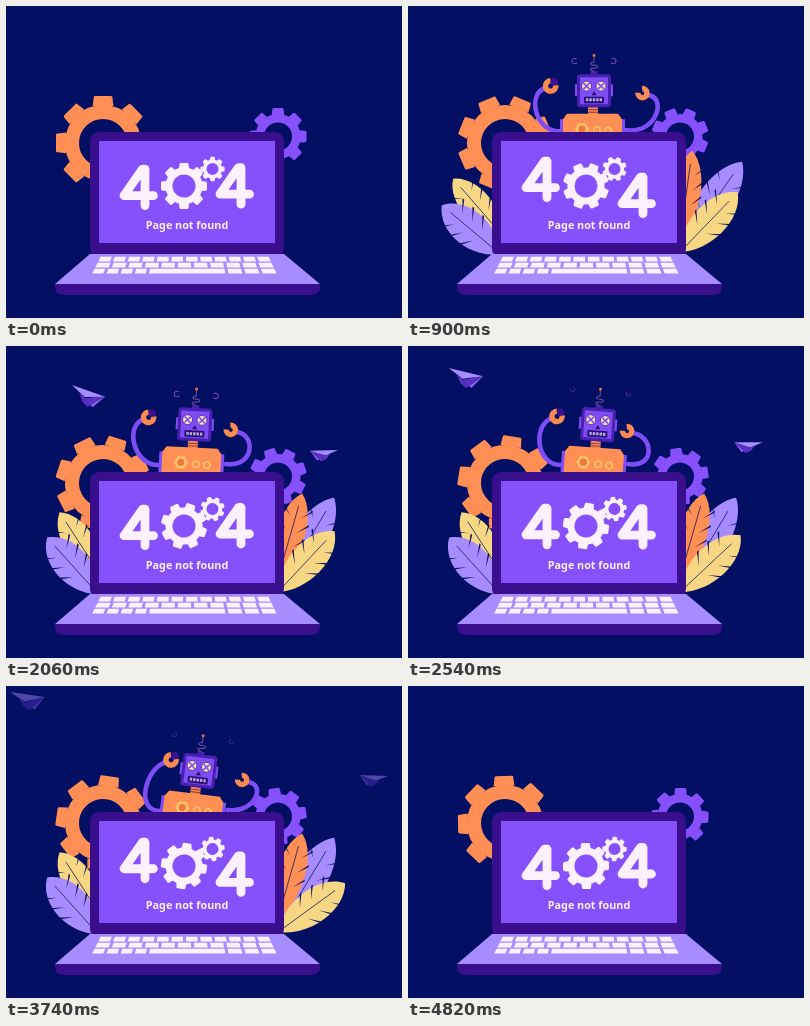
An HTML page that plays this animation: 396x312 px, repeating every 4.84 s.

```html
<!DOCTYPE html>
<html lang="en">
<head>
<meta charset="utf-8">
<title>404</title>
<style>
  html, body { margin: 0; width: 100%; height: 100%; overflow: hidden; background: #020f62; }
  svg { display: block; width: 100vw; height: 100vh; }
  text { font: 600 10.8px "Noto Sans", "Open Sans", sans-serif; }
</style>
</head>
<body>
<svg viewBox="0 0 396 312">
  <rect width="396" height="312" fill="#020f62"/>
  <g id="back"></g>
  <g id="planes"></g>

  <g id="robot">
    <g fill="none" stroke="#7f4df5" stroke-width="4.6" stroke-linecap="round">
      <path id="armL"/><path id="armR"/>
    </g>
    <g id="clawL">
      <circle cx="5.5" r="4" fill="#3a128f"/>
      <path d="M4 -3.5A5.2 5.2 0 1 0 4 3.5" fill="none" stroke="#fb8a50" stroke-width="5.4"/>
    </g>
    <g id="clawR">
      <path d="M3.5 -3A4.6 4.6 0 1 0 3.5 3" fill="none" stroke="#fb8a50" stroke-width="5.4"/>
    </g>
    <g id="torso">
      <path d="M152 112H217V142H152Z" fill="#7f4df5"/>
      <path d="M155 112L159 106.500H210L214 112V142H155Z" fill="#ff8f55"/>
      <path d="M167 122l3.500-6h7l3.500 6-3.500 6h-7Z" fill="#ffc46a"/>
      <circle cx="174" cy="122" r="3.600" fill="#f0783f"/>
      <g fill="#ff8f55" stroke="#ffc46a" stroke-width="1.600">
        <circle cx="189" cy="123" r="3.200"/><circle cx="200" cy="123.500" r="3.200"/>
      </g>
      <path d="M180 100h10v7h-10Z" fill="#fb8a50"/>
      <path d="M180 102.500h10M180 105h10" stroke="#8a3550"/>
      <path d="M167 77h38v12h-38Z" fill="#7f4df5"/>
      <path d="M169 69l2-2h30l2 2v29l-2 2h-30l-2-2Z" fill="#4a20b0"/>
      <path d="M172 70h28v27h-28Z" fill="#7f4df5"/>
      <g id="eyes"></g>
      <path d="M186 84l2.500 4h-5Z" fill="#2a0d78"/>
      <rect x="176" y="89.500" width="20" height="6.500" rx="1" fill="#2a0d78"/>
      <path d="M178 92.700h16" stroke="#b7a9d8" stroke-width="3" stroke-dasharray="2.400 1"/>
      <path d="M182 67h8l-1-3h-6Z" fill="#4a20b0"/>
      <path d="M186 64c-5-1-5-3 0-3s5-3 0-3-4-3 0-3v-7" fill="none" stroke="#6a4a9c" stroke-width="1.100"/>
      <circle cx="186" cy="48" r="1.500" fill="#e0763f"/>
      <g fill="none" stroke-width="1.200">
        <path id="sparkL" d="M-2 2.500a3 3 0 1 1 4 0" stroke="#6b45c8"/>
        <path id="sparkR" d="M-2 2.500a3 3 0 1 1 4 0" stroke="#8a45a8"/>
      </g>
    </g>
  </g>

  <g id="leaves"></g>

  <rect x="84" y="126" width="194" height="126" rx="9" fill="#390f8e"/>
  <rect x="93" y="135" width="176" height="102" fill="#8650fd"/>
  <path d="M84 248H278L314 278H49Z" fill="#a78cff"/>
  <path d="M49 278H314V281Q314 289 304 289H59Q49 289 49 281Z" fill="#390f8e"/>
  <g id="keys" fill="#fdf1ff"></g>
  <g id="digits" fill="none" stroke="#fdf1ff" stroke-width="8.800" stroke-linejoin="round" stroke-linecap="round"></g>
  <g id="cogs"></g>
  <text x="181" y="223" text-anchor="middle" fill="#fdf1ff">Page not found</text>
</svg>
<script>
const LOOP = 4840, TAU = Math.PI * 2;
const $ = id => document.getElementById(id);

function add(parent, name, attrs = {}) {
  const el = document.createElementNS('http://www.w3.org/2000/svg', name);
  for (const k in attrs) el.setAttribute(k, attrs[k]);
  return parent.appendChild(el);
}
const set = (el, transform) => el.setAttribute('transform', transform);

// Easing over a time span
const ramp = (t, from, to) => Math.min(1, Math.max(0, (t - from) / (to - from)));
const easeIn = (t, from, to) => ramp(t, from, to) ** 2;
const easeOut = (t, from, to) => 1 - (1 - ramp(t, from, to)) ** 2;
const smooth = (t, from, to) => (1 - Math.cos(ramp(t, from, to) * Math.PI)) / 2;

// Gears make one turn per loop
function gear(parent, x, y, tip, rim, hole, color, dir) {
  const g = add(parent, 'g', { fill: color });
  add(g, 'circle', { r: (rim + hole) / 2, fill: 'none', stroke: color, 'stroke-width': rim - hole });
  const w = tip * 0.2, root = rim - 1;
  for (let a = 0; a < 360; a += 45) {
    add(g, 'path', {
      d: `M${-w * 1.1} ${-root}L${-w} ${1.5 - tip}Q${-w} ${-tip} ${1.5 - w} ${-tip}H${w - 1.5}Q${w} ${-tip} ${w} ${1.5 - tip}L${w * 1.1} ${-root}Z`,
      transform: `rotate(${a})`
    });
  }
  return t => set(g, `translate(${x} ${y}) rotate(${dir * 360 * t / LOOP})`);
}
const gears = [
  gear($('back'), 97, 137, 47, 38, 24, '#ff8f55', 1),
  gear($('back'), 272, 130.5, 28.5, 22.5, 14, '#8650fd', -1),
  gear($('cogs'), 178, 180, 23, 18.5, 11.5, '#fdf1ff', 1),
  gear($('cogs'), 206.5, 163, 12.2, 9.6, 6, '#fdf1ff', -1)
];

// Leaves grow out of their base, swing into place, and may droop later
function leaf(x, y, len, bulge, color, angle, swing, droop = 0) {
  const g = add($('leaves'), 'g');
  const side = s => `${len * 0.25} ${s * bulge} ${len * 0.8} ${s * bulge * 1.1}`;
  add(g, 'path', {
    d: `M0 0C${side(-1)} ${len} 0C${len * 0.8} ${bulge * 1.1} ${len * 0.25} ${bulge} 0 0Z`,
    fill: color
  });
  let cuts = '';
  for (const s of [-1, 1]) {
    for (let q = 0.48; q < 0.85; q += 0.17) {
      cuts += `M${len * (q - 0.1)} ${s * bulge * 0.3}L${len * q} ${s * bulge * 0.85}h2.2Z`;
    }
  }
  add(g, 'path', { d: cuts, fill: '#0a1460' });
  add(g, 'path', { d: `M0 0H${len * 0.85}`, stroke: '#0a1460', 'stroke-width': 0.7 });
  return t => {
    const a = angle + swing * (1 - smooth(t, 1150, 1650)) + droop * smooth(t, 2060, 3240);
    const size = easeOut(t, 120, 820) * (1 - easeIn(t, 3760, 4290));
    set(g, `translate(${x} ${y}) rotate(${a}) scale(${size})`);
  };
}
const yellow = '#f8d784', lilac = '#a78cff', orange = '#ff8f55';
const leaves = [
  leaf(95, 230, 76, 19, yellow, -123, -8),
  leaf(92, 248, 76, 22, lilac, -132, -8),
  leaf(275, 240, 103, 22, lilac, -59, 4),
  leaf(272, 232, 88, 18, orange, -74, -8),
  leaf(272, 246, 83, 21, yellow, -47, 1, 11)
];

// Paper planes glide out, slowing towards a limit
const glide = (limit, dist, tau) => t => limit + dist * Math.exp((2060 - t) / tau);
const tilt = glide(0, 13, 800);
function plane(x, y, pose) {
  const g = add($('planes'), 'g');
  add(g, 'path', { d: 'M9 6L16 10L20 18L14 14Z', fill: '#5a30c4' });
  add(g, 'path', { d: 'M16 10L35 4L25 17Z', fill: '#8a66f0' });
  add(g, 'path', { d: 'M16 10L35 4L20 18Z', fill: '#5a30c4' });
  add(g, 'path', { d: 'M0 0L35 4L15 9Z', fill: lilac });
  return t => {
    g.setAttribute('opacity', ramp(t, 1350, 1750) * (1 - ramp(t, 3200, 4200)));
    set(g, `translate(${x(t)} ${y(t)}) ${pose(t)}`);
  };
}
const planes = [
  plane(glide(-26, 92, 1500), glide(1.4, 37.6, 800), t => `rotate(${tilt(t)})`),
  plane(glide(396, -64, 1100), glide(88.6, 15.4, 700), t => `rotate(${8 - tilt(t) * 0.3}) scale(-.8 .7)`)
];

// Robot
for (const x of [178.5, 193]) {
  add($('eyes'), 'circle', { cx: x, cy: 79, r: 5, fill: '#f3dfae', stroke: '#4a20b0', 'stroke-width': 0.8 });
  add($('eyes'), 'path', { d: `M${x - 3} 76l6 6m0-6l-6 6`, stroke: '#7f4df5', 'stroke-width': 1.5 });
}
function robot(t) {
  const drift = ramp(t, 900, 3740), lean = 7 * drift;
  const lift = -5 + 105 * (1 - easeOut(t, 120, 1150) + easeIn(t, 3560, 4320));
  const lx = 142.5 + 22.5 * ramp(t, 2060, 3740), ly = 79 - 6 * drift;
  const rx = 228 - 9 * Math.cos(TAU * (t - 2580) / 2700), ry = 86 + 7 * drift;
  set($('robot'), `translate(0 ${lift})`);
  set($('torso'), `rotate(${lean} 186 140)`);
  $('armL').setAttribute('d', `M${153 + lean / 2} 124C126 126 ${lx - 24} ${ly + 5} ${lx - 4} ${ly + 2}`);
  $('armR').setAttribute('d', `M${218 + lean / 2} 123C250 127 ${rx + 25} ${ry + 2} ${rx + 4} ${ry + 2}`);
  set($('clawL'), `translate(${lx} ${ly}) rotate(-50)`);
  set($('clawR'), `translate(${rx} ${ry}) rotate(-135)`);

  const p = (t / 1160 + 0.6) % 1, dist = 12 + 20 * p;
  for (const [id, side] of [['sparkL', -1], ['sparkR', 1]]) {
    set($(id), `translate(${186 + side * dist} ${64 - 24 * p * (1.5 - p)}) rotate(${side * 260 * p}) scale(${1.1 - 0.5 * p})`);
    $(id).setAttribute('opacity', Math.min(1, p * 8, (1 - p) * 3));
  }
}

// Keyboard: each row is a list of relative key widths, wider towards the viewer
const rows = [Array(12).fill(1), Array(11).fill(1), [1, 1, 1, 1, 5.6, 1.2, 1.2, 1.2]];
rows.forEach((row, r) => {
  const top = 250.8 + r * 6, bottom = top + 4.6, total = row.reduce((a, b) => a + b);
  const px = (u, y) => 180 + (u * 2 - 1) * (85.5 + (y - 251) * 0.5);
  let from = 0;
  for (const w of row) {
    const u = from / total, v = (from + w) / total - 0.017;
    add($('keys'), 'path', {
      d: `M${px(u, top)} ${top}H${px(v, top)}L${px(v, bottom)} ${bottom}H${px(u, bottom)}Z`
    });
    from += w;
  }
});

// Digits bob in opposite directions, twice per loop
const four = x => add($('digits'), 'path', { d: `M${x} 198V161.500H${x - 2.5}L${x - 21} 188H${x + 8.5}` });
const digitL = four(139), digitR = four(235);
function digits(t) {
  const c = Math.cos((t - 1020) * 2 * TAU / LOOP);
  set(digitL, `translate(0 ${-2.2 - 4.3 * c})`);
  set(digitR, `translate(0 ${4.7 + 5.2 * c})`);
}

const parts = [...gears, ...leaves, ...planes, robot, digits];
function draw() {
  const t = performance.now() % LOOP;
  for (const part of parts) part(t);
  requestAnimationFrame(draw);
}
draw();
</script>
</body>
</html>
```
